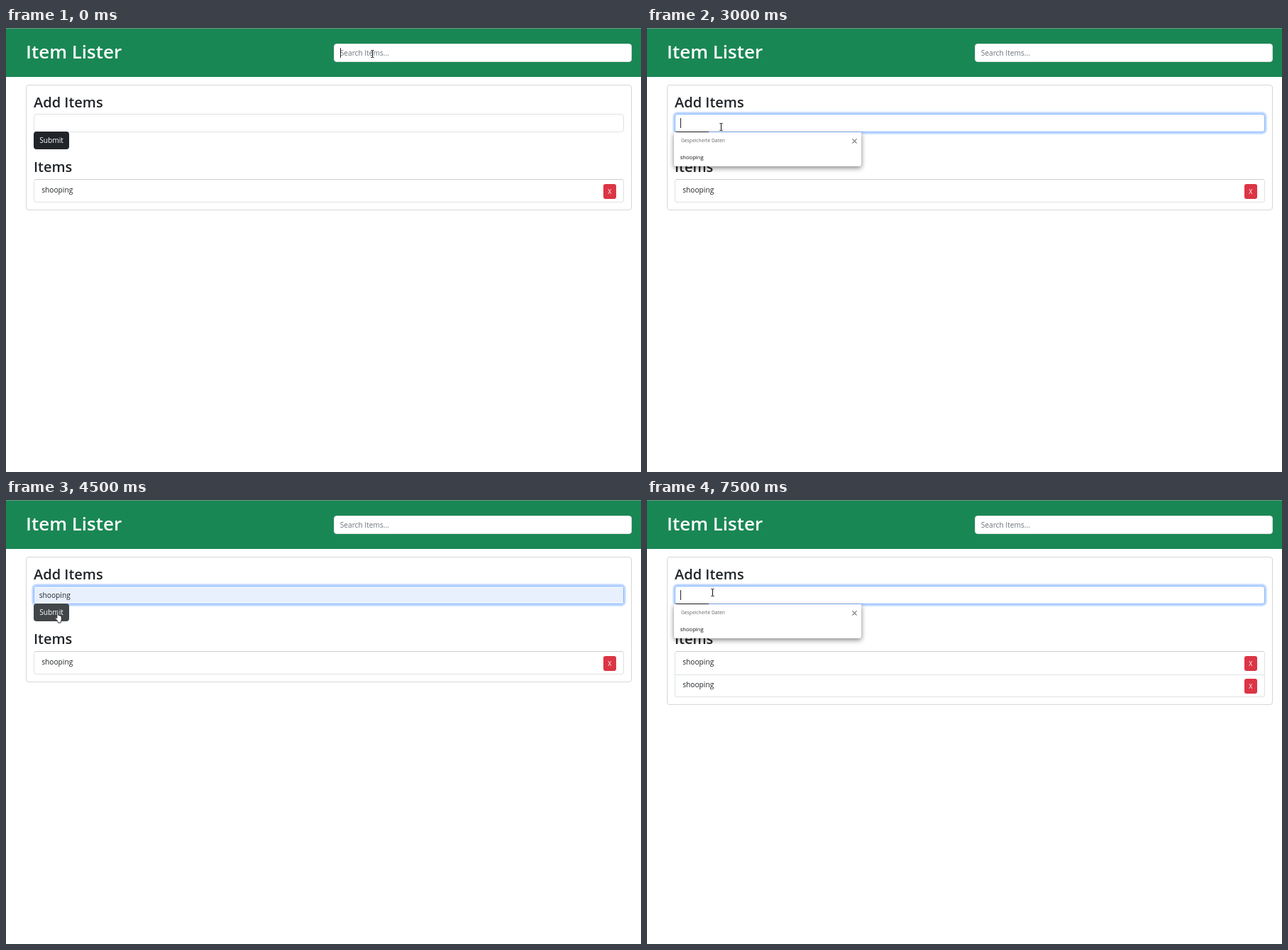
Recreate the animation shown at these times as an HTML page. Size 895 by 626 pixels, loop 8 s.

```html
<!DOCTYPE html>
<html lang="en">
<head>
<meta charset="utf-8">
<title>Item Lister</title>
<style>
* { box-sizing: border-box; }
html, body { margin: 0; width: 100%; height: 100%; overflow: hidden; background: #fff; }
body { position: relative; font: 10.2px/16px "Open Sans", sans-serif; color: #212529; }
body *, body { animation: 8s step-end infinite; }
div, span, h1, h2, svg { position: absolute; margin: 0; white-space: nowrap; }
h1, h2 { font-weight: 600; line-height: 1.2; }
h1 { left: 28px; top: 18px; font-size: 26px; color: #fff; }
h2 { left: 39px; font-size: 20px; }

header { position: absolute; inset: 0 0 auto; height: 69px; background: #198754; border-top: 1px solid #6c9a85; }
.card { left: 27.5px; top: 80px; width: 854.5px; height: 177px; border: 1px solid #d6d6d6; border-radius: 4px; animation-name: card; }
.box { border: 1px solid #dee2e6; border-radius: 4px; background: #fff; }
.search { left: 462px; top: 22px; width: 420px; height: 25.5px; animation-name: search; }
.field { left: 38.7px; top: 121px; width: 832.3px; height: 25.5px; animation-name: field; }
.fill { inset: 0; border-radius: 3px; background: #e8f0fe; animation-name: fill; }
.list { left: 38.7px; top: 213px; width: 832.3px; height: 32.5px; border-top-color: #c9cccf; animation-name: list; overflow: hidden; }
.row { left: 0; top: 0; width: 100%; height: 32px; }
.row + .row { top: 31.5px; border-top: 1px solid #dee2e6; }
.row span { left: 10.5px; top: 6px; }
.row + .row span { top: 5px; }
.row b { position: absolute; left: 802px; top: 5.5px; width: 18px; height: 21px; border-radius: 3px; background: #dc3545; color: #fff; font: 8.9px/21px "Open Sans", sans-serif; text-align: center; }
.row + .row b { top: 5px; }
.submit { left: 39px; top: 146px; width: 50px; height: 25px; border-radius: 4px; background: #212529; color: #fff; line-height: 25px; text-align: center; animation-name: submit; }
.caret { width: 1px; height: 14px; background: #212529; }

.popup { left: 38px; top: 147px; width: 264px; height: 48px; background: #fff; border-radius: 0 0 3px 3px; box-shadow: 0 2px 6px rgba(0,0,0,.38), 0 4px 9px rgba(0,0,0,.14); color: #111; animation-name: popup; }
.popup .title { left: 10px; top: 4px; font-size: 6.7px; color: #666; }
.popup .entry { left: 8.7px; top: 27px; font-size: 7.6px; }
.popup .mark { left: 2.5px; top: 22.5px; width: 259px; height: 23.5px; background: #e1edfa; border: 1px solid #6ba5dc; border-radius: 1px; animation-name: preview; }
.popup svg { left: 250.5px; top: 8.5px; }
.preview { left: 47px; top: 126px; font: 8.9px/16px "Liberation Sans", Arial, sans-serif; color: #000; -webkit-text-stroke: .25px; animation-name: preview; }

@keyframes search { 0%, 25% { box-shadow: none; border-color: #dee2e6; } 6.25% { box-shadow: 0 0 0 2.67px rgba(13,110,253,.25); border-color: #86b7fe; } }
@keyframes field { 0%, 62.5% { box-shadow: none; border-color: #dee2e6; } 25%, 81.25% { box-shadow: 0 0 0 2.67px rgba(13,110,253,.25); border-color: #86b7fe; } }
@keyframes fill { 0%, 62.5% { visibility: hidden; } 43.75% { visibility: visible; } }
@keyframes popup { 0%, 50% { visibility: hidden; } 25%, 81.25% { visibility: visible; } }
@keyframes preview { 0%, 50% { visibility: hidden; } 43.75% { visibility: visible; } }
@keyframes typed { 0%, 62.5% { visibility: hidden; } 50% { visibility: visible; } }
@keyframes submit { 0%, 68.75% { background: #212529; } 56.25% { background: #424649; } }
@keyframes card { 0% { height: 177px; } 62.5% { height: 208.5px; } }
@keyframes list { 0% { height: 32.5px; } 62.5% { height: 64.5px; } }
@keyframes searchCaret { 0%, 18.75% { visibility: visible; } 6.25%, 25% { visibility: hidden; } }
@keyframes fieldCaret { 0%, 31.25%, 43.75%, 87.5% { visibility: hidden; } 25%, 37.5%, 81.25%, 93.75% { visibility: visible; } }
@keyframes typedCaret { 0%, 56.25% { visibility: hidden; } 50% { visibility: visible; } }

/* Pointer shapes share the stage; each one shows only in its own time slots. */
.ibeam { animation-name: ibeam; }
.arrow { animation-name: arrow; }
.hand { left: 69px; top: 157px; animation-name: hand; }
@keyframes ibeam {
  0% { left: 514px; top: 31px; visibility: visible; }
  6.25% { left: 67px; top: 124px; visibility: visible; }
  12.5% { left: 302px; top: 124px; visibility: visible; }
  18.75%, 43.75% { visibility: hidden; }
  25% { left: 84px; top: 129px; visibility: visible; }
  31.25% { left: 102px; top: 134px; visibility: visible; }
  62.5% { left: 80px; top: 139px; visibility: visible; }
  68.75%, 100% { left: 90px; top: 125px; visibility: visible; }
}
@keyframes arrow {
  0%, 25%, 56.25% { visibility: hidden; }
  18.75% { left: 360px; top: 117px; visibility: visible; }
  43.75% { left: 77px; top: 187px; visibility: visible; }
  50% { left: 108px; top: 180px; visibility: visible; }
}
@keyframes hand { 0%, 62.5% { visibility: hidden; } 56.25% { visibility: visible; } }
</style>
</head>
<body>
<header></header>
<h1>Item Lister</h1>
<div class="box search"></div>
<span style="left:470.7px;top:27px;color:#6c757d">Search Items...</span>
<div class="caret" style="left:471px;top:28px;animation-name:searchCaret"></div>

<div class="card"></div>
<h2 style="top:93px">Add Items</h2>
<div class="box field"><div class="fill"></div></div>
<span style="left:46.7px;top:126px;animation-name:typed">shooping</span>
<span class="preview">shooping</span>
<div class="caret" style="left:47px;top:127px;animation-name:fieldCaret"></div>
<div class="caret" style="left:91px;top:127px;animation-name:typedCaret"></div>
<div class="submit">Submit</div>
<h2 style="top:184px">Items</h2>
<div class="box list">
  <div class="row"><span>shooping</span><b>X</b></div>
  <div class="row"><span>shooping</span><b>X</b></div>
</div>

<div class="popup">
  <div class="mark"></div>
  <span class="title">Gespeicherte Daten</span>
  <span class="entry">shooping</span>
  <svg width="7" height="7"><path d="M.5 .5l6 6m0-6l-6 6" stroke="#333"/></svg>
</div>

<svg class="ibeam" width="6" height="12"><path d="M.5 .5h1.5l.5 .5 .5-.5h1.5M2.5 1v9M.5 10.5h1.5l.5-.5 .5 .5h1.5" fill="none" stroke="#111"/></svg>
<svg class="arrow" width="10" height="14"><path d="M.5 .7v10.6l2.4-2.2 1.7 3.7 1.6-.7-1.6-3.6h3.2z" fill="#fff" stroke="#111" stroke-width=".8"/></svg>
<svg class="hand" width="11" height="17"><path d="M2.8 9.8V1.6q0-1.1 1-1.1t1 1.1v4q1-.5 1.6.4 1-.4 1.5.5 1.3-.2 1.3 1.2v4q0 1-.8 2.2v2.2H4.1v-1.7L.8 10.2q-.6-1.2.3-1.6.8-.2 1.7 1.2z" fill="#fff" stroke="#111" stroke-width=".8"/></svg>
</body>
</html>
```
